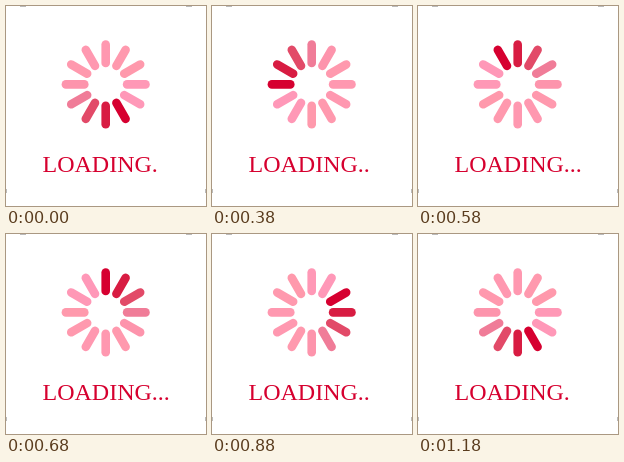
An HTML page for the animation above (1.2 s loop, 200 by 200 pixels).

```html
<!DOCTYPE html>
<html lang="en">
<head>
<meta charset="utf-8">
<title>Loading</title>
<style>
  html, body { margin: 0; width: 100%; height: 100%; overflow: hidden; background: #fff; }
  svg { display: block; width: 100vw; height: 100vh; }
  .spoke { stroke-width: 8.6; stroke-linecap: round; animation: tint 1200ms step-end infinite; }
  text { font: 24px "Liberation Serif", "Times New Roman", serif; font-kerning: none; fill: #d6002f; }
  .dot2 { animation: second 1200ms -20ms step-end infinite; }
  .dot3 { animation: third 1200ms -20ms step-end infinite; }

  @keyframes tint {
    0% { stroke: #d60030; }
    8.333% { stroke: #ff98b8; }
    16.666% { stroke: #ff98b6; }
    25% { stroke: #ff99ac; }
    33.333% { stroke: #ff99ae; }
    41.666% { stroke: #ff98b0; }
    58.333% { stroke: #ff99ae; }
    66.666% { stroke: #fd94ac; }
    75% { stroke: #f07c98; }
    83.333% { stroke: #e24a68; }
    91.666%, 100% { stroke: #d81c42; }
  }
  @keyframes second {
    0% { visibility: hidden; }
    25%, 100% { visibility: visible; }
  }
  @keyframes third {
    0% { visibility: hidden; }
    50% { visibility: visible; }
    75%, 100% { visibility: hidden; }
  }
</style>
</head>
<body>
<svg viewBox="0 0 200 200">
  <path d="M14 .5h6M180 .5h6M.5 183v4M199.5 183v4" stroke="#bbb"/>
  <g id="wheel" transform="translate(99.7 78.4)"></g>
  <text x="36.5" y="165.5">LOADING.<tspan class="dot2">.</tspan><tspan class="dot3">.</tspan></text>
</svg>
<script>
  const wheel = document.getElementById("wheel");
  // Spokes sit at clock positions; the dark one starts at five o'clock.
  for (let hour = 0; hour < 12; hour++) {
    const spoke = document.createElementNS("http://www.w3.org/2000/svg", "path");
    spoke.setAttribute("class", "spoke");
    spoke.setAttribute("d", "M0 -21.4V-39.8");
    spoke.setAttribute("transform", `rotate(${hour * 30})`);
    spoke.style.animationDelay = `${-20 - 100 * ((17 - hour) % 12)}ms`;
    wheel.append(spoke);
  }
</script>
</body>
</html>
```
